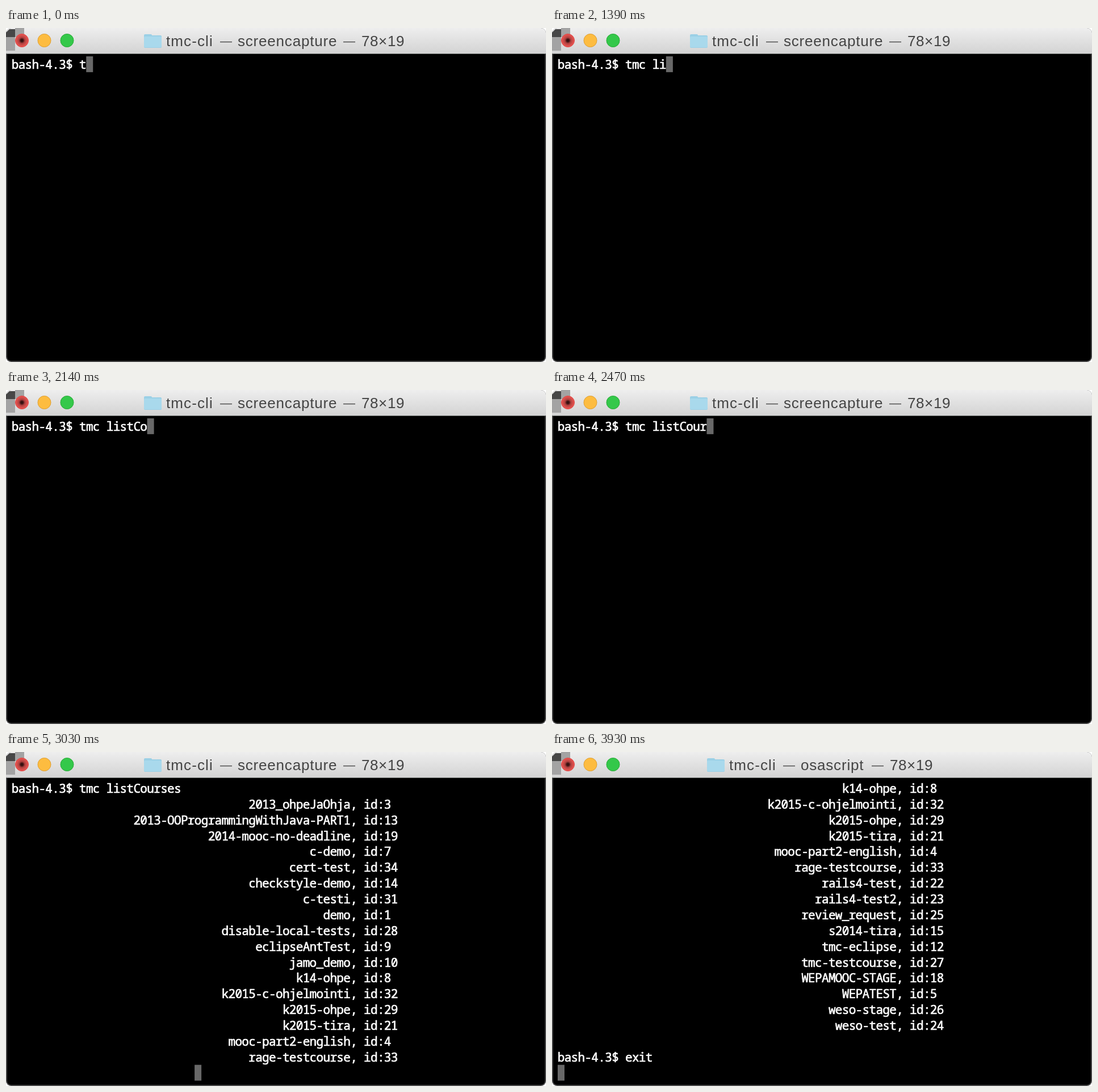
Recreate the animation shown at these times as an HTML page with a canvas. Size 951 px wide and 589 px high, loop 8590 ms.

```html
<!DOCTYPE html>
<html lang="en">
<head>
<meta charset="utf-8">
<title>Terminal</title>
<style>
  html, body { margin: 0; width: 100%; height: 100%; overflow: hidden; background: #fff; }
  canvas { display: block; }
</style>
</head>
<body>
<canvas id="stage" width="951" height="589"></canvas>
<script>
const ctx = document.getElementById('stage').getContext('2d');
const W = 951, H = 589, LOOP = 8590;
const COL = 11.93, ROW = 27.87, LEFT = 10, TOP = 50, ROWS = 19;
const PROMPT = 'bash-4.3$ ', COMMAND = 'tmc listCourses';

const courses = `2013_ohpeJaOhja 3
2013-OOProgrammingWithJava-PART1 13
2014-mooc-no-deadline 19
c-demo 7
cert-test 34
checkstyle-demo 14
c-testi 31
demo 1
disable-local-tests 28
eclipseAntTest 9
jamo_demo 10
k14-ohpe 8
k2015-c-ohjelmointi 32
k2015-ohpe 29
k2015-tira 21
mooc-part2-english 4
rage-testcourse 33
rails4-test 22
rails4-test2 23
review_request 25
s2014-tira 15
tmc-eclipse 12
tmc-testcourse 27
WEPAMOOC-STAGE 18
WEPATEST 5
weso-stage 26
weso-test 24`.split('\n').map(line => {
  const [name, id] = line.split(' ');
  return name.padStart(50) + ', id:' + id;
});

// When each character of the command appears.
const keyTimes = [0, 790, 900, 1040, 1230, 1390, 1570, 1640, 1710, 2140, 2350, 2470, 2530, 2640, 2740];
const ENTER = 2850, LIST = 3030, SCROLL = 3730, READY = 3830, EXIT = 3930;

// Process name with the left edges of the folder and of the second dash.
const titles = {
  capture: ['screencapture', 243, 594],
  shell: ['sh', 315, 521],
  script: ['osascript', 273, 563]
};

function titleAt(t) {
  if (t >= EXIT) return titles.script;
  return t >= 1710 && t < 2140 ? titles.shell : titles.capture;
}

// The last line holds the cursor at its end.
function linesAt(t) {
  const typed = PROMPT + COMMAND.slice(0, keyTimes.filter(k => k <= t).length);
  if (t < ENTER) return [typed];
  if (t < LIST) return [typed, ''];
  if (t < SCROLL) return [typed, ...courses.slice(0, 17), ' '.repeat(27)];
  const done = [typed, ...courses, ''];
  if (t < READY) return [...done, ''];
  if (t < EXIT) return [...done, PROMPT];
  return [...done, PROMPT + 'exit', ''];
}

function rect(color, x, y, w, h) {
  ctx.fillStyle = color;
  ctx.fillRect(x, y, w, h);
}

function disc(x, y, r, fill, edge) {
  ctx.beginPath();
  ctx.arc(x, y, r, 0, Math.PI * 2);
  ctx.fillStyle = fill;
  ctx.fill();
  ctx.strokeStyle = edge;
  ctx.lineWidth = 1;
  ctx.stroke();
}

function rounded(color, x, y, w, h, r) {
  ctx.fillStyle = color;
  ctx.beginPath();
  ctx.roundRect(x, y, w, h, r);
  ctx.fill();
}

function drawFolder(x) {
  rounded('#9bd0e6', x, 11, 14, 8, 2);
  rounded('#9bd0e6', x, 13, 31, 22, 2);
  rounded('#a9d9ec', x, 15, 31, 19, 2);
}

function word(text, x, y, size, spacing) {
  ctx.font = size + 'px "Liberation Sans", Arial, sans-serif';
  ctx.letterSpacing = spacing + 'px';
  ctx.fillText(text, x, y);
}

function drawTitle([process, x, dash]) {
  drawFolder(x);
  ctx.fillStyle = '#444';
  word('tmc-cli', x + 39, 32, 26, 1.1);
  word('—', x + 134, 30, 21, 0);
  word(process, x + 165, 32, 26, 0.8);
  word('—', dash, 30, 21, 0);
  word('78×19', dash + 32, 32, 26, 0.6);
  ctx.letterSpacing = '0px';
}

function drawWindow() {
  rect('#fff', 0, 0, W, H);
  rounded('#484848', 0, 0, W, H, 9);
  rounded('#000', 2, 40, W - 4, H - 42, [0, 0, 7, 7]);

  const bar = ctx.createLinearGradient(0, 0, 0, 45);
  bar.addColorStop(0, '#eeeeee');
  bar.addColorStop(1, '#d3d3d3');
  rounded(bar, 0, 0, W, 45, [9, 9, 0, 0]);
  rect('#6c706e', 0, 45, W, 1);
}

// Shaded patch in the upper left corner, below the buttons.
function drawCorner() {
  rect('#a3a3a3', 16, 0, 16, 16);
  rect('#a3a3a3', 0, 16, 16, 24);
  ctx.fillStyle = '#474747';
  ctx.beginPath();
  ctx.moveTo(6, 2);
  ctx.lineTo(16, 2);
  ctx.lineTo(16, 16);
  ctx.lineTo(0, 16);
  ctx.lineTo(0, 8);
  ctx.fill();
}

function drawButtons() {
  const red = ctx.createRadialGradient(28, 22, 2, 28, 22, 11.5);
  red.addColorStop(0, '#371010');
  red.addColorStop(0.35, '#b04240');
  red.addColorStop(1, '#f05552');
  disc(28, 22, 11.5, red, '#df4744');
  disc(67.5, 22, 11.5, '#fdbc40', '#de9f34');
  disc(107.5, 22, 11.5, '#34c84a', '#27aa35');
}

function drawScreen(lines) {
  const view = lines.slice(-ROWS);
  const last = view.length - 1;
  rect('#686868', LEFT + view[last].length * COL, TOP + last * ROW, 12, ROW);
  ctx.fillStyle = ctx.strokeStyle = '#fff';
  ctx.lineWidth = 0.7;
  ctx.lineJoin = 'round';
  ctx.font = '500 21px "Noto Sans Mono", "DejaVu Sans Mono", monospace';
  view.forEach((line, row) => {
    const y = TOP + 22 + row * ROW;
    [...line].forEach((char, col) => {
      if (char === ' ') return;
      const x = LEFT - 0.3 + col * COL;
      ctx.fillText(char, x, y);
      ctx.strokeText(char, x, y);
    });
  });
}

const start = performance.now();

function draw() {
  const t = (performance.now() - start) % LOOP;
  drawWindow();
  drawCorner();
  drawButtons();
  drawTitle(titleAt(t));
  drawScreen(linesAt(t));
  requestAnimationFrame(draw);
}
draw();
</script>
</body>
</html>
```
